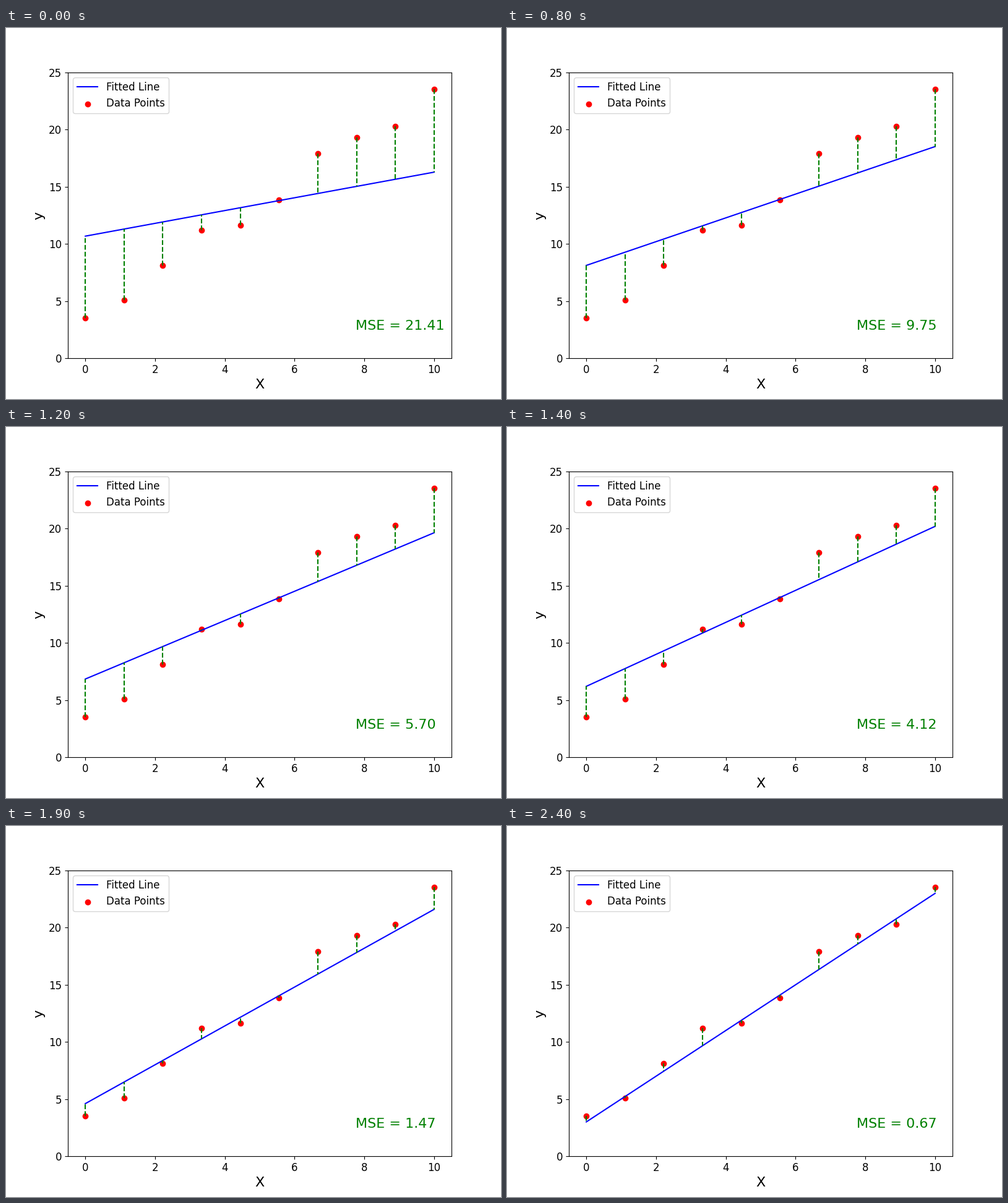
These frames come from a looping animation (800x600 px, 3.4 s). A matplotlib script:

```python
import numpy as np
import matplotlib.pyplot as plt
from matplotlib.animation import FuncAnimation

STEPS = 24      # line moves during these steps, then rests
FRAMES = 34
INTERVAL = 100

rng = np.random.RandomState(42)
x = np.linspace(0, 10, 10)
y = 2 * x + 3 + rng.randn(10)

plt.rcParams.update({"font.family": "DejaVu Sans", "font.size": 12})
fig, ax = plt.subplots(figsize=(8, 6), dpi=100)
ax.set_xlim(-0.5, 10.5)
ax.set_ylim(0, 25)
ax.set_xlabel("X", fontsize=16)
ax.set_ylabel("y", fontsize=16)

line, = ax.plot([], [], color="blue", label="Fitted Line")
ax.scatter(x, y, color="red", label="Data Points")
residuals = [ax.plot([], [], color="green", linestyle="--")[0] for _ in x]
mse_text = ax.text(0.75, 0.1, "", transform=ax.transAxes,
                   fontsize=16, color="green")
ax.legend(loc="upper left")


def update(frame):
    step = min(frame, STEPS)
    slope = 0.56 + 0.06 * step
    intercept = 10.68 - 0.32 * step
    fit = slope * x + intercept

    line.set_data(x, fit)
    for seg, xi, yi, fi in zip(residuals, x, y, fit):
        seg.set_data([xi, xi], [yi, fi])
    mse_text.set_text(f"MSE = {np.mean((y - fit) ** 2):.2f}")
    return [line, mse_text, *residuals]


anim = FuncAnimation(fig, update, frames=FRAMES, interval=INTERVAL,
                     init_func=lambda: update(0), repeat=True, repeat_delay=0)
plt.show()
```
